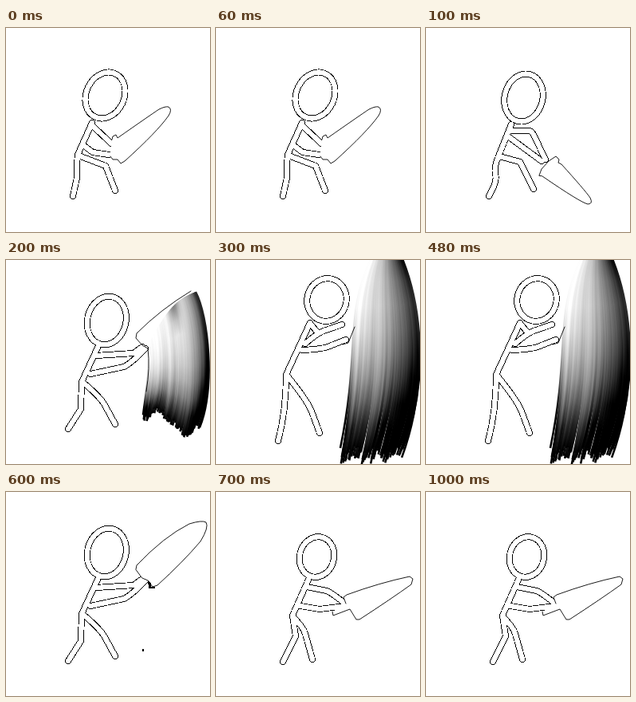
An HTML page with a canvas that plays this animation: 256 by 256 pixels, repeating every 1.2 s.

```html
<!DOCTYPE html>
<html lang="en">
<head>
<meta charset="utf-8">
<title>Sword swing</title>
<style>
  html, body { margin: 0; width: 100%; height: 100%; overflow: hidden; background: #fff; }
  .stage { position: relative; width: 256px; height: 256px; overflow: hidden; }
  .strip { position: absolute; left: 0; top: 0; width: 1536px; height: 256px; animation: swing 1.2s step-end infinite; }
  .strip > * { position: absolute; left: 0; top: 0; }
  svg { fill: none; stroke-linejoin: round; stroke-linecap: round; shape-rendering: crispEdges; }
  .ink { stroke: #000; stroke-width: 8; }
  .paper { stroke: #fff; stroke-width: 6.2; }
  .blade { fill: #fff; }
  .blade, .edge { stroke: #000; stroke-width: 0.9; }
  .speck { fill: #000; }
  /* one 256px cell per pose */
  @keyframes swing {
    0% { transform: translateX(0); }
    8.3333% { transform: translateX(-256px); }
    16.6667% { transform: translateX(-512px); }
    25% { transform: translateX(-768px); }
    50% { transform: translateX(-1024px); }
    58.3333% { transform: translateX(-1280px); }
    100% { transform: translateX(-1280px); }
  }
</style>
</head>
<body>
<div class="stage">
  <div class="strip">
    <canvas id="smears" width="1536" height="256"></canvas>
    <svg width="1536" height="256" viewBox="0 0 1536 256">
      <defs>
        <g id="ready">
          <ellipse cx="124.5" cy="84.5" rx="23.8" ry="30" transform="rotate(25 124.5 84.5)"/>
          <path d="M108 119L90 159Q88 174 89 188L84 211M91 160L125 173L137 204"/>
          <path d="M108 122L132 145M97 147L109 156L129 159"/>
        </g>
        <g id="low">
          <ellipse cx="122.5" cy="87.5" rx="23.8" ry="30.3" transform="rotate(15 122.5 87.5)"/>
          <path d="M107 121L91 161Q85 175 87 183Q90 192 79 211M92 161L118 168L135 202"/>
          <path d="M106 129H130Q133 130 135 134L150 165M103 136L145 167"/>
        </g>
        <g id="raise">
          <ellipse cx="126.3" cy="76" rx="24.2" ry="30.6" transform="rotate(14 126.3 76)"/>
          <path d="M115 110L95 153L94 187L78 212M97 154Q120 173 125 184L137 206"/>
          <path d="M113 120L160 117L171 109M106 143L148 134Q158 129 175 111"/>
        </g>
        <g id="strike">
          <ellipse cx="139" cy="50" rx="24.6" ry="27" transform="rotate(15 139 50)"/>
          <path d="M118 79L88 144Q88 190 78 227M90 146Q115 177 120 190L130 217"/>
          <path d="M112 105Q129 90 138 88L158 81M118 80L128 91M108 113Q136 112 145 107L163 100"/>
        </g>
        <g id="rest">
          <ellipse cx="126.5" cy="81.5" rx="21.5" ry="25.5" transform="rotate(15 126.5 81.5)"/>
          <path d="M116 110L96 155L100 181L84 213M96 156Q110 170 112 178L121 210"/>
          <path d="M114 119L139 124Q146 127 163 141M106 143L130 147L162 143"/>
        </g>
      </defs>

      <g>
        <use href="#ready" class="ink"/><use href="#ready" class="paper"/>
        <path class="blade" d="M133 140L134 136L138 134L140 138Q180 110 192 102Q200 98 204 99Q209 102 204 110Q190 130 149 167L144 170L140 165L134 165L131 161"/>
      </g>

      <g transform="translate(256)">
        <use href="#low" class="ink"/><use href="#low" class="paper"/>
        <path class="blade" d="M142 185L145 177L154 167L163 161L167 165L166 169L170 171Q199 203 206 213Q210 221 203 221Q194 219 146 186Z"/>
      </g>

      <g transform="translate(512)">
        <use href="#raise" class="ink"/><use href="#raise" class="paper"/>
        <path class="edge" d="M176 165Q181 135 178 111L171 107L163 98L164 92Q194 62 232 39"/>
      </g>

      <g transform="translate(768)">
        <use href="#strike" class="ink"/><use href="#strike" class="paper"/>
        <path class="edge" d="M159 106L166 104L174 84"/>
      </g>

      <g transform="translate(1024)">
        <use href="#raise" class="ink"/><use href="#raise" class="paper"/>
        <path class="blade" d="M163 97L164 92Q198 56 230 40Q246 35 251 38Q255 44 244 62Q222 88 190 117L184 119L178 111L171 108Z"/>
        <path class="speck" d="M178 111L182 114L182 119L187 119V121H179ZM171 197h2v3h-2z"/>
      </g>

      <g transform="translate(1280)">
        <use href="#rest" class="ink"/><use href="#rest" class="paper"/>
        <path class="blade" d="M146 150L147 155L168 147L176 160L180 160Q220 134 245 116L247 109L243 106Q205 114 164 129L160 132L163 140"/>
      </g>
    </svg>
  </div>
</div>
<script>
  const ctx = document.getElementById('smears').getContext('2d');
  const STREAKS = 90;

  function seeded(seed) {
    return () => (seed = (seed * 16807) % 2147483647) / 2147483647;
  }

  // Curved strokes blended from the left edge to the right edge.
  function smear({ cell, seed, left, right, bulge, sag, ragged, dark }) {
    const rand = seeded(seed);
    let grain = 0;
    ctx.save();
    ctx.beginPath();
    ctx.rect(cell * 256, 0, 256, 256);
    ctx.clip();
    ctx.translate(cell * 256, 0);
    for (let i = 0; i <= STREAKS; i++) {
      const u = i / STREAKS;
      const p = left.map((a, k) => a + (right[k] - a) * u);
      p[1] -= bulge * Math.sin(Math.PI * u);
      p[7] += (rand() - 0.5) * ragged + Math.sin(u * 19) * ragged * 0.3 - sag * Math.sin(2 * Math.PI * u);
      grain = grain * 0.8 + (rand() - 0.5) * 0.12;

      const tone = ctx.createLinearGradient(0, p[1], 0, p[7]);
      for (let v = 0; v <= 1; v += 0.125) {
        const d = dark(u, v) + grain * Math.min(1, 0.3 + v);
        const level = Math.round(255 * (1 - Math.min(1, Math.max(0, d))));
        tone.addColorStop(v, `rgb(${level},${level},${level})`);
      }
      ctx.strokeStyle = tone;
      ctx.lineWidth = 2.6;
      ctx.beginPath();
      ctx.moveTo(p[0], p[1]);
      ctx.bezierCurveTo(...p.slice(2));
      ctx.stroke();
    }
    ctx.restore();
  }

  smear({
    cell: 2, seed: 71, bulge: 14, sag: 11, ragged: 9,
    left: [177, 110, 182, 135, 175, 170, 172, 199],
    right: [238, 40, 254, 70, 263, 160, 243, 207],
    dark: (u, v) => 0.85 * u ** 4.5 + 0.9 * v ** 4 + 0.3 * u * v + 0.9 * (1 - u) ** 6 * v * v
      + 0.45 * Math.exp(-(((u - 0.55) / 0.1) ** 2)) * Math.max(0, 1 - v * 5)
  });

  smear({
    cell: 3, seed: 29, bulge: 0, sag: 0, ragged: 20,
    left: [196, -4, 160, 70, 182, 110, 156, 246],
    right: [232, -6, 256, 50, 270, 150, 234, 244],
    dark: (u, v) => 0.8 * u ** 1.7 + 0.95 * v ** 2.6 + 0.9 * (1 - u) ** 8 * Math.max(0, v - 0.3)
      + 0.2 * Math.max(0, 1 - v * 5) * u
  });
</script>
</body>
</html>
```
